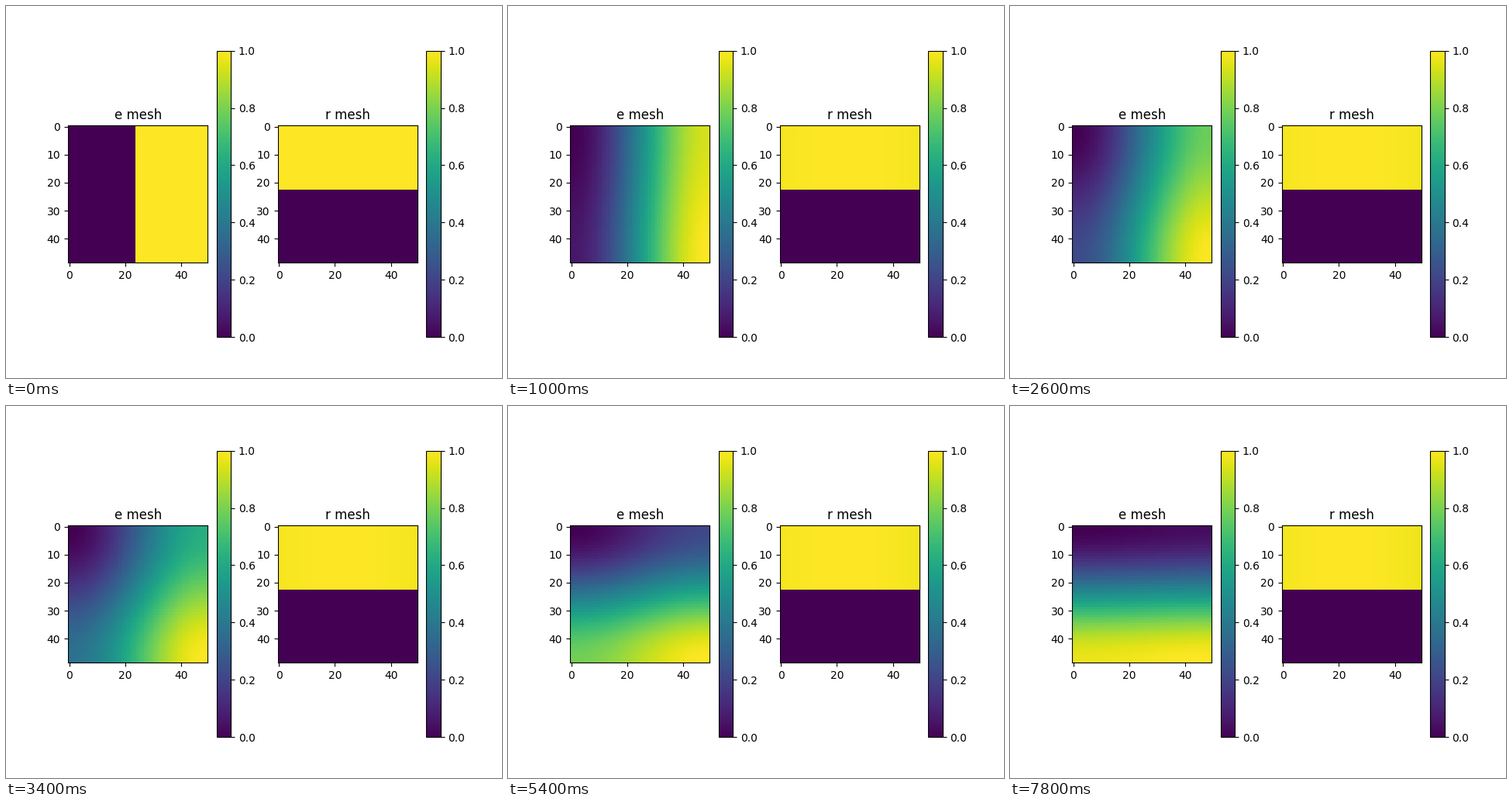
Animation, 640 px wide and 480 px high, one loop 8 s. Source, as a matplotlib script:

```python
import numpy as np
import matplotlib.pyplot as plt
from matplotlib.animation import FuncAnimation

ROWS, COLS = 49, 50
SPLIT_ROW, SPLIT_COL = 23, 24
FRAMES, STEP_MS = 40, 200

rows, cols = np.mgrid[0:ROWS, 0:COLS]


def mode(u, sharp=0.0):
    """Slowest diffusion mode from 0 to 1, with a fading third harmonic."""
    wave = np.cos(np.pi * u) - sharp * np.cos(3 * np.pi * u)
    return (1 - wave / (1 - sharp)) / 2


def e_mesh(k):
    if k == 0:
        return (cols >= SPLIT_COL).astype(float)
    across = mode(cols / (COLS - 1), 0.3 * np.exp(-1.4 * k))
    down = mode(rows / (ROWS - 1))
    mix = 1 / (1 + np.exp(-0.18 * (k - 19.8)))
    return (1 - mix) * across + mix * down


def r_mesh(k):
    top = (rows < SPLIT_ROW).astype(float)
    if k == 0:
        return top
    dip = 0.016 + 0.010 * k / FRAMES
    centre = 24 - 2.5 * k / FRAMES
    return top * (1 - dip * ((cols - centre) / 27) ** 2)


def add_panel(fig, slot, title, mesh):
    ax = fig.add_subplot(1, 2, slot)
    ax.set_title(title)
    image = ax.imshow(mesh, cmap="viridis", vmin=0, vmax=1)
    fig.colorbar(image, ax=ax)
    return image


plt.rcParams["font.family"] = "DejaVu Sans"
fig = plt.figure(figsize=(6.4, 4.8), dpi=100)
e_image = add_panel(fig, 1, "e mesh", e_mesh(0))
r_image = add_panel(fig, 2, "r mesh", r_mesh(0))


def update(k):
    e_image.set_data(e_mesh(k))
    r_image.set_data(r_mesh(k))
    return e_image, r_image


anim = FuncAnimation(fig, update, frames=FRAMES, interval=STEP_MS,
                     repeat=True, repeat_delay=0, blit=False)
plt.show()
```
